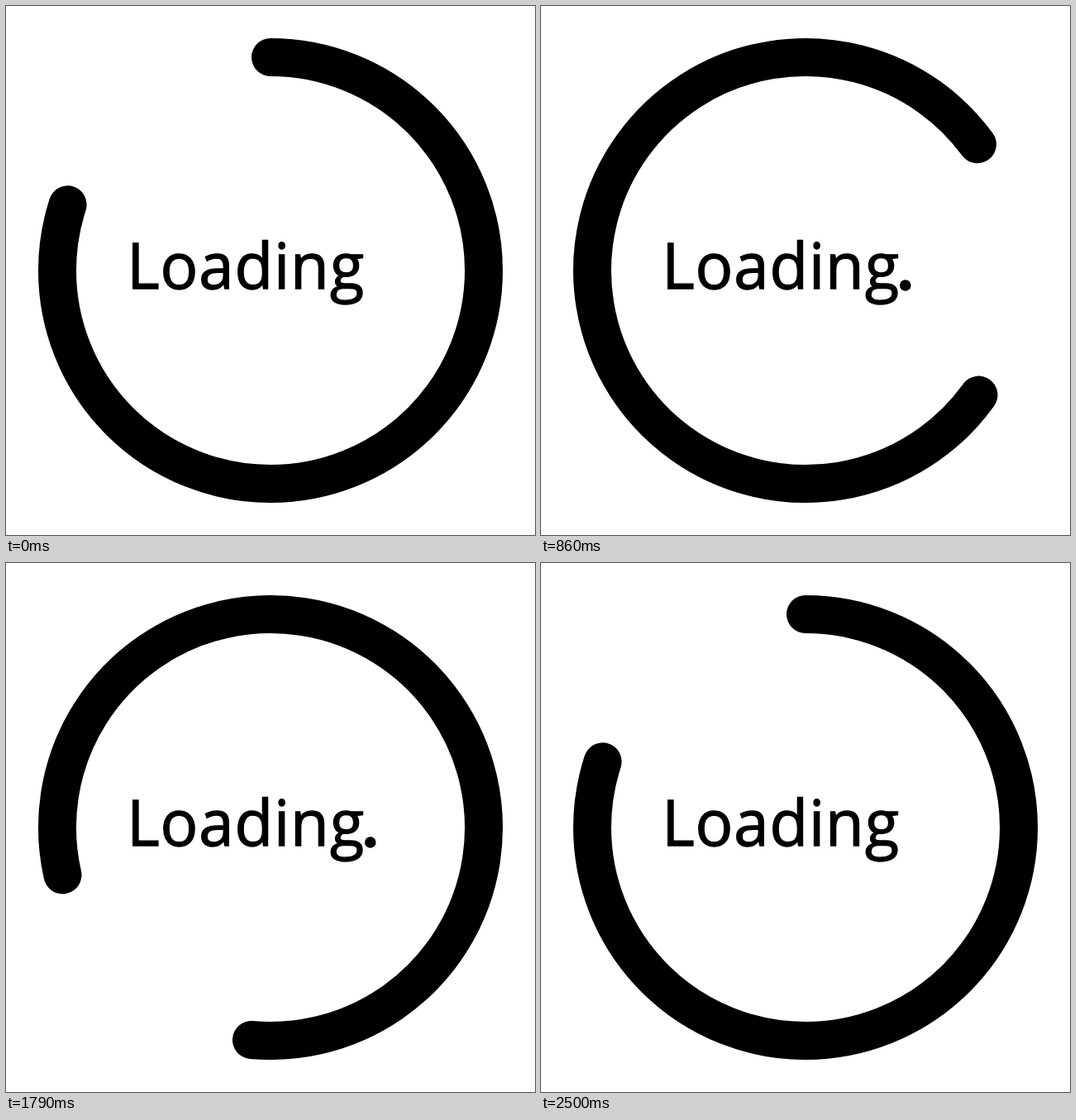
Animation of 640x640 px, one loop 2570 ms. Source, as an HTML page:

```html
<!DOCTYPE html>
<html lang="en">
<head>
<meta charset="utf-8">
<title>Loading</title>
<style>
  html, body { margin: 0; height: 100%; overflow: hidden; background: #fff; }
  svg { display: block; width: 100vw; height: 100vh; }
  text {
    font: 76px "Open Sans", "Noto Sans", sans-serif;
    letter-spacing: .9px;
    stroke: #000;
    stroke-width: 1.3px;
  }
</style>
</head>
<body>
<svg viewBox="0 0 640 640">
  <circle id="ring" cx="320" cy="320" r="258" fill="none" stroke="#000" stroke-width="46"
          stroke-linecap="round" pathLength="360" stroke-dasharray="288 72"/>
  <text x="146.2" y="342.4">Loading</text>
  <g id="dots">
    <circle cx="440.8" cy="338" r="6.8"/>
    <circle cx="459.4" cy="338" r="6.8"/>
    <circle cx="478" cy="338" r="6.8"/>
  </g>
</svg>
<script>
  const LOOP = 2570;       // ms
  const STEPS = 63;        // positions in one turn
  const DOT_CYCLE = 21;    // positions per run of the dots
  const ring = document.getElementById('ring');
  const dots = [...document.getElementById('dots').children];

  function draw(time) {
    // 14 pictures a second, timed in whole hundredths of a second
    const tick = Math.floor((Math.floor(time % LOOP / 10) + 0.5) * 0.14);
    const step = Math.round(tick * 1.8);
    const count = Math.ceil(step % DOT_CYCLE / DOT_CYCLE * 4) % 4;

    ring.setAttribute('transform', `rotate(${step * 360 / STEPS - 90} 320 320)`);
    dots.forEach((dot, i) => dot.setAttribute('visibility', i < count ? 'visible' : 'hidden'));
  }

  const start = performance.now();
  function loop() {
    draw(performance.now() - start);
    requestAnimationFrame(loop);
  }
  loop();
</script>
</body>
</html>
```
